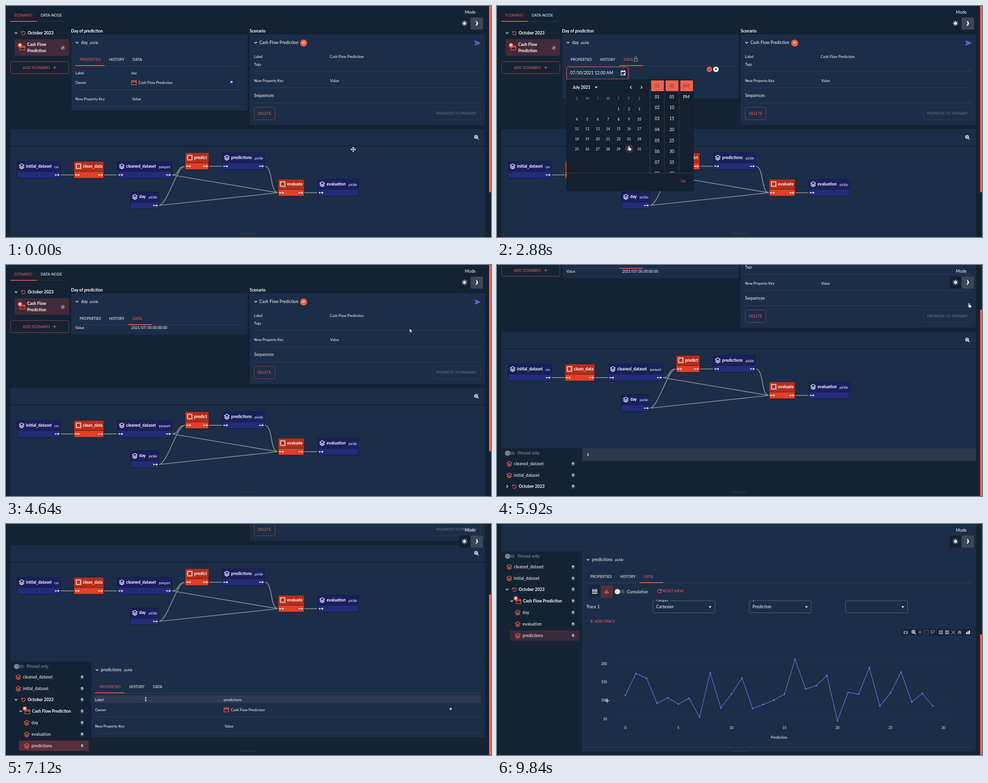
An HTML page that plays this animation: 1007x480 px, repeating every 10000 ms.

```html
<!DOCTYPE html>
<html lang="en">
<head>
<meta charset="utf-8">
<title>Scenario dashboard</title>
<style>
html, body { margin: 0; width: 100%; height: 100%; overflow: hidden; background: #142334; }
svg { display: block; width: 100vw; height: 100vh; }
text { font: 7.5px Lato, "Open Sans", sans-serif; letter-spacing: .01em; fill: #fff; white-space: pre; }
.m { font-size: 8.6px; }
.b { font-size: 8.6px; font-weight: 700; letter-spacing: 0; }
.s { font-size: 6.8px; }
.xs { font-size: 6px; }
.or { fill: #f5604c; }
.gr { fill: #66748a; }
.dim { fill: #8f9aaa; }
.faint { fill: #35455a; }
.mid { text-anchor: middle; }
.end { text-anchor: end; }
.ln { fill: none; stroke: #fff; stroke-width: 1.1; }
.ln.o { stroke: #f5604c; }
.card { fill: #1c2d47; }
.rule { stroke: #34445c; stroke-width: .8; }
.edge { fill: none; stroke: #888c90; stroke-width: 1.7; }
#page { animation: scroll 10s linear infinite; }
#thumb { animation: thumb 10s linear infinite; }
#cursor { animation: cursor 10s ease-in-out infinite; }
@keyframes scroll {
  0%, 52% { transform: translateY(0); }
  57%, 64.5% { transform: translateY(-117px); }
  65.4%, 66.4% { transform: translateY(-140px); }
  68%, 75% { transform: translateY(-212px); }
  78.4% { transform: translateY(-409px); }
  80.5%, 100% { transform: translateY(-441px); }
}
@keyframes thumb {
  0%, 52% { transform: translateY(0) scaleY(.806); }
  57%, 63.19% { transform: translateY(93px) scaleY(.806); }
  63.2%, 64.5% { transform: translateY(90.4px) scaleY(.773); }
  65.4%, 65.59% { transform: translateY(108px) scaleY(.773); }
  65.6%, 66.4% { transform: translateY(97px) scaleY(.694); }
  68%, 74.39% { transform: translateY(146.5px) scaleY(.694); }
  74.4%, 75% { transform: translateY(110.5px) scaleY(.521); }
  78.4% { transform: translateY(212.5px) scaleY(.521); }
  80.5%, 100% { transform: translateY(229.5px) scaleY(.521); }
}
@keyframes cursor {
  0%, 1% { transform: translate(721px, 298px); }
  7.5%, 9% { transform: translate(272px, 108px); }
  14%, 16% { transform: translate(295px, 131px); }
  20%, 22% { transform: translate(262px, 139px); }
  27%, 30% { transform: translate(274px, 291px); }
  33%, 34.5% { transform: translate(386px, 363px); }
  38.5%, 40% { transform: translate(441px, 131px); }
  46.4% { transform: translate(838px, 132px); }
  50%, 59.2% { transform: translate(980px, 79px); }
  62.8%, 64% { transform: translate(21px, 459px); }
  65.4%, 66% { transform: translate(30px, 460px); }
  68%, 68.8% { transform: translate(75px, 460px); }
  71.2% { transform: translate(290px, 364px); }
  72%, 72.6% { transform: translate(314px, 337px); }
  74.2%, 100% { transform: translate(229px, 367px); }
}
</style>
</head>
<body>
<svg id="stage" viewBox="0 0 1007 480" preserveAspectRatio="none"></svg>
<script>
const LOOP = 10000, ORANGE = '#f5604c';
const rules = [];

// Content that is visible only between two times (ms).
function during(from, to, ...parts) {
  const name = `w${from}-${to}`;
  const rule = `@keyframes ${name}{0%{opacity:${from ? 0 : 1}}` +
    (from ? `${from / LOOP * 100}%{opacity:1}` : '') +
    (to < LOOP ? `${to / LOOP * 100}%{opacity:0}100%{opacity:0}}` : '100%{opacity:1}}');
  if (!rules.includes(rule)) rules.push(rule);
  return `<g style="animation:${name} 10s step-end infinite">${parts.join('')}</g>`;
}

// Text is placed by its left edge and vertical middle.
const text = (x, y, s, cls = '') => `<text x="${x}" y="${y + 2.8}" class="${cls}">${s}</text>`;
const box = (x, y, x2, y2, fill, extra = '') =>
  `<rect x="${x}" y="${y}" width="${x2 - x}" height="${y2 - y}" fill="${fill}" ${extra}/>`;
const card = (x, y, x2, y2) => box(x, y, x2, y2, '#1c2d47', 'rx="2"');
const frame = (x, y, x2, y2, color) => box(x + .5, y + .5, x2 - .5, y2 - .5, 'none', `rx="3" stroke="${color}"`);
const rule = (x, x2, y) => `<path class="rule" d="M${x} ${y}H${x2}"/>`;
const dot = (x, y, r, fill) => `<circle cx="${x}" cy="${y}" r="${r}" fill="${fill}"/>`;
const path = (x, y, d, cls = 'ln', extra = '') => `<path transform="translate(${x} ${y})" class="${cls}" d="${d}" ${extra}/>`;
const solid = (x, y, d, fill = '#fff') => path(x, y, d, '', `fill="${fill}"`);

const down = (x, y) => path(x, y, 'M-2.8-1.4L0 1.4L2.8-1.4');
const right = (x, y) => path(x, y, 'M-1.4-2.8L1.4 0L-1.4 2.8');
const left = (x, y) => path(x, y, 'M1.4-2.8L-1.4 0L1.4 2.8');
const caret = (x, y) => solid(x, y, 'M-3-1.5H3L0 1.8Z');
const plus = (x, y) => path(x, y, 'M-3.2 0H3.2M0-3.2V3.2', 'ln o');
const cycle = (x, y) => path(x, y, 'M-2.8-2A3.7 3.7 0 1 1-3.3 2M-3.8-4V-1.4H-1', 'ln o');
const stack = (x, y, cls = 'ln o') => path(x, y, 'M0-5L5-2L0 1L-5-2ZM-5 .6L0 3.4L5 .6M-5 2.8L0 5.6L5 2.8', cls, 'stroke-width=".9"');
const clap = (x, y) => path(x, y, 'M-5-4H5V4.5H-5ZM-5-1H5M-3-4L-1.5-1M0-4L1.5-1M3-4L4.5-1', 'ln o');
const chip = (x, y) => path(x, y, 'M-4.2-4.2H4.2V4.2H-4.2Z') +
  path(x, y, 'M-5.6-5.6H5.6V5.6H-5.6Z', 'ln', 'stroke-dasharray="1.2 1.6" stroke-width="1"');
const pin = (x, y) => dot(x, y, 4.6, '#344357') + solid(x, y, 'M-1.8-3H1.8V0L2.6 1H.5V3.5H-.5V1H-2.6L-1.8 0Z', '#b4bcc8');
const badge = (x, y) => dot(x, y, 4.6, ORANGE) + path(x, y, 'M-1.2 2.4V-2H1.4V.4H-1.2', 'ln', 'stroke-width=".8"');
const launch = (x, y) => box(x - 3, y - 3, x + 3, y + 3, '#3343a8', 'rx="1"') + path(x, y, 'M-1.5 1.5L1.5-1.5M-.5-1.5H1.5V.5', 'ln', 'stroke-width=".8"');
const lens = (x, y, c = '#fff') => `<g fill="none" stroke="${c}" stroke-width="1.3"><circle cx="${x - 1}" cy="${y - 1}" r="3.1"/><path d="M${x + 1.3} ${y + 1.3}l3 3M${x - 2.6} ${y - 1}h3.2M${x - 1} ${y - 2.6}v3.2"/></g>`;

function tabs(xs, y, active, lineEnd) {
  const spans = [[xs[0] - 9, xs[0] + 52], [xs[1] - 9, xs[1] + 40], [xs[2] - 9, xs[2] + 40]];
  const [a, b] = spans[active];
  return ['PROPERTIES', 'HISTORY', 'DATA'].map((s, i) => text(xs[i], y, s, i === active ? 'or' : '')).join('') +
    rule(a < xs[0] ? a : xs[0] - 9, lineEnd, y + 13.5) + box(a, y + 12, b, y + 13.5, ORANGE);
}

function navigation() {
  return text(17, 19, 'SCENARIO', 'or') + text(72, 19, 'DATA-NODE') + rule(9, 125, 32) + box(9, 31, 64, 32.5, ORANGE) +
    down(21, 56) + cycle(36, 56) + text(45, 56, 'October 2023', 'b') +
    box(18, 69, 131, 103.5, '#432a39', 'rx="2"') + clap(34, 87) + badge(29, 81.5) +
    text(44, 80, 'Cash Flow', 'b') + text(44, 93, 'Prediction', 'b') +
    dot(118, 87, 4.8, '#65505d') + path(118, 87, 'M-1.8 1.8L1.8-1.8', 'ln', 'stroke-width="1.8"') +
    frame(9, 115, 131, 141, '#843f40') + text(35, 128, 'ADD SCENARIO', 'or') + plus(101, 128);
}

function picker() {
  let out = box(145, 153, 408, 384, '#14202f', 'rx="3" stroke="#0f1a28"') +
    text(157, 169, 'July 2021', 'b') + caret(206, 169) + left(278, 169) + right(300, 169);
  [...'SMTWTFS'].forEach((d, i) => out += text(166 + 21.6 * i, 192, d, 's mid dim'));
  out += during(2720, 3440, dot(274.5, 296.5, 9, '#3b3138'));
  for (let d = 1; d <= 31; d++) {
    const cell = d + 3;
    out += text(166 + 21.6 * (cell % 7), 214 + 20.7 * Math.floor(cell / 7), d, 's mid');
  }
  const two = n => String(n).padStart(2, '0');
  [320, 350, 380.5].forEach(x => out += box(x, 154.5, x + 26.5, 177, ORANGE) + `<path class="rule" d="M${x - 2.5} 154V347"/>`);
  let rows = '';
  for (let i = 0; i < 9; i++) {
    const y = 166 + 22.75 * i, cls = i ? 'm mid' : 'm mid faint';
    rows += text(332.5, y, two(i || 12), cls) + text(363, y, two(i * 5), cls);
    if (i < 2) rows += text(393, y, i ? 'PM' : 'AM', cls);
  }
  return out + `<g clip-path="url(#list)">${rows}</g>` + rule(145, 408, 347) + text(381, 364, 'OK', 'or');
}

function dayPanel() {
  const x = [153, 214, 263];
  const head = down(147.5, 76) + text(156, 76, 'day', 'm') + text(174, 76.5, 'pickle', 's');
  const value = (a, b, date) => during(a, b, card(136, 59, 501.5, 144.5), head, tabs(x, 111, 2, 494),
    text(144, 130, 'Value'), text(260, 130, date + ' 00:00:00'));
  return text(135, 52, 'Day of prediction', 'b') +
    during(0, 840, card(136, 59, 501.5, 217), head, tabs(x, 111, 0, 494),
      text(144, 139, 'Label'), text(260, 139, 'day'), text(144, 159, 'Owner'), clap(265.5, 159),
      text(275, 159, 'Cash Flow Prediction'), launch(468, 158), rule(144, 494, 174),
      text(144, 193, 'New Property Key'), text(262, 193, 'Value'), rule(144, 494, 208)) +
    value(840, 1560, '2021/07/26') + value(3960, LOOP, '2021/07/30') +
    during(1560, 3960, card(136, 59, 501.5, 191.5), head, tabs(x, 111, 2, 494),
      path(288, 110.5, 'M-3-1H3V4.5H-3ZM-2-1V-3A2 2 0 0 1 2-3V-1', 'ln', 'style="stroke:#8f9aaa"'),
      frame(144, 126, 273.5, 152.5, ORANGE),
      during(1560, 2800, text(152, 139, '07/26/2021 12:00 AM', 'm')),
      during(2800, 3960, text(152, 139, '07/30/2021 12:00 AM', 'm')),
      path(262, 139, 'M-4.2-4H4.2V4.5H-4.2ZM-4.2-2.6H4.2M-2.4-5.5V-3M2.4-5.5V-3'), box(263, 140, 265.5, 142.5, '#fff'),
      dot(441, 131.5, 5.6, ORANGE), path(441, 131.5, 'M-2.6 0L-.6 2L2.8-1.8', 'ln', 'style="stroke:#26202c"'),
      dot(454.5, 131.5, 5.6, '#fff'), path(454.5, 131.5, 'M-2-2L2 2M2-2L-2 2', 'ln', 'style="stroke:#14202f"'));
}

function scenarioPanel() {
  return text(506, 52, 'Scenario', 'b') + card(506, 59, 994.5, 247) + down(518.5, 76) +
    text(526, 76, 'Cash Flow Prediction', 'm') + dot(618, 77, 7.2, ORANGE) + path(618, 77, 'M-1.5 2V-1.5H1.5V.5', 'ln', 'stroke-width=".8"') +
    solid(979, 77, 'M-6-5.5L7 0L-6 5.5L-5 1L1 0L-5-1Z', '#5b70d8') +
    text(515, 105, 'Label') + text(672, 105, 'Cash Flow Prediction') + text(515, 121, 'Tags') + rule(515, 986, 136) +
    text(515, 155, 'New Property Key') + text(673, 155, 'Value') + rule(515, 986, 170) +
    text(515, 186.5, 'Sequences', 'm') + rule(515, 986, 201.5) +
    frame(515, 210, 559, 237, '#843f40') + text(523, 223.5, 'DELETE', 'or') +
    frame(885, 210, 986, 237, '#2c3b52') + text(893, 223.5, 'PROMOTE TO PRIMARY', 'gr');
}

// x, y, width, name, type (none for tasks), has input, has output
const NODES = [
  [23, 323, 90, 'initial_dataset', 'csv', 0, 1], [141, 323, 62, 'clean_data', '', 1, 1],
  [231, 323, 113, 'cleaned_dataset', 'parquet', 1, 1], [372, 305, 49, 'predict', '', 1, 1],
  [449, 305, 88, 'predictions', 'pickle', 1, 1], [258, 386.5, 59, 'day', 'pickle', 0, 1],
  [565, 360, 54, 'evaluate', '', 1, 1], [647, 360, 85, 'evaluation', 'pickle', 1, 0]
];
const LINKS = [[0, 1], [1, 2], [2, 3], [2, 6], [5, 3], [5, 6], [3, 4], [4, 6], [6, 7]];

function graph() {
  const port = (x, y) => dot(x - 3.2, y, 1.3, '#fff') + path(x, y, 'M-3 0H4M2-1.8L4.2 0L2 1.8');
  const edges = LINKS.map(([a, b]) => {
    const x1 = NODES[a][0] + NODES[a][2], y1 = NODES[a][1] + 28, x2 = NODES[b][0], y2 = NODES[b][1] + 28;
    const c = x2 - x1 > 100 ? 4 : 18;
    return `<path class="edge" d="M${x1} ${y1}C${x1 + c} ${y1} ${x2 - c} ${y2} ${x2} ${y2}"/>`;
  }).join('');
  const nodes = NODES.map(([x, y, w, name, type, input, output]) =>
    box(x, y, x + w, y + 35, type ? '#232c79' : '#e23f27', 'rx="2" stroke="#10182c"') +
    box(x + .5, y + .5, x + w - .5, y + 21, type ? '#1a1f5d' : '#b52d1b') +
    `<path d="M${x} ${y + 21}h${w}" stroke="#10182c" stroke-opacity=".7"/>` +
    (type ? stack(x + 9.5, y + 10, 'ln') + text(x + w - 3, y + 11, type, 's end') : chip(x + 9.5, y + 10)) +
    text(x + 18.5, y + 10, name, 'b') +
    (input ? port(x + 7, y + 28) : '') + (output ? port(x + w - 7, y + 28) : '')).join('');
  return card(9, 256, 994.5, 498) + `<path d="M9 291H994" stroke="#121f31" stroke-width="1.5"/>` + lens(977, 273) + edges + nodes;
}

function tree() {
  const row = (y, x, name, cls) => text(x, y, name, cls) + pin(158, y);
  const leaf = (y, name) => stack(43, y) + row(y, 53, name, 'm');
  return box(17, 504.5, 37, 511.5, '#3f4a58', 'rx="3.5"') + dot(22, 508, 5.6, '#77808c') + text(43, 508.5, 'Pinned only', 'm dim') +
    stack(25.5, 530) + row(530, 35, 'cleaned_dataset', 'm') + stack(25.5, 554) + row(554, 35, 'initial_dataset', 'm') +
    during(0, 6320, right(21, 577)) + during(6320, LOOP, down(21, 577)) + cycle(36, 577) + row(577, 45, 'October 2023', 'b') +
    during(6320, LOOP, clap(44.5, 602), badge(39, 595.5), row(601, 54, 'Cash Flow Prediction', 'b'),
      during(6320, 6560, right(30, 601))) +
    during(6560, LOOP, down(30.5, 601),
      during(6840, 7320, box(27, 662, 171.5, 683.5, '#592f39', 'rx="2"')),
      during(7320, LOOP, box(27, 662, 171.5, 683.5, '#3c2a39', 'rx="2"')),
      leaf(625, 'day'), leaf(649, 'evaluation'), leaf(673, 'predictions'));
}

const VALUES = [114, 173, 160, 92, 107, 90, 106, 55, 175, 80, 117, 161, 78, 89, 101,
  117, 212, 131, 140, 168, 45, 122, 117, 189, 85, 120, 177, 96, 119, 85];

function chart() {
  const px = i => 266.5 + 22.02 * i, py = v => 884.2 - .766 * v;
  let out = '';
  for (let v = 50; v <= 200; v += 50)
    out += `<path d="M238 ${py(v)}H955" stroke="#24354e" stroke-width=".8"/>` + text(228.5, py(v), v, 's end');
  for (let i = 0; i <= 30; i += 5) out += text(px(i), 864, i, 's mid');
  const points = VALUES.map((v, i) => [px(i), py(v)]);
  return out + `<polyline points="${points.join(' ')}" fill="none" stroke="#636bd6" stroke-width="1.3"/>` +
    points.map(([x, y]) => dot(x, y, 1.6, '#6d76e6')).join('') + text(585.5, 884, 'Prediction', 'mid');
}

function modebar() {
  const grey = 'style="stroke:#7c8794"';
  const icon = (x, d) => path(x, 666, d, 'ln', grey);
  return box(838, 659.5, 985, 673, '#17243a') + box(844, 663.5, 853, 669.5, '#7c8794', 'rx="1"') + dot(848.5, 666.5, 1.7, '#17243a') +
    lens(865.5, 666, '#e8ebf0') + icon(878.5, 'M-4 0H4M0-4V4') + path(891.5, 666, 'M-4-4H4V4H-4Z', 'ln', grey + ' stroke-dasharray="1.6 1.2"') +
    icon(904.5, 'M-3 4Q-1 2-3 1Q-6-3 0-3.6Q6-3 3 0Q0 2-3 1') +
    [921.5, 934.5].map(x => box(x - 4, 662, x + 4, 670, '#7c8794')).join('') +
    path(921.5, 666, 'M-2.5 0H2.5M0-2.5V2.5', 'ln', 'style="stroke:#17243a"') + path(934.5, 666, 'M-2.5 0H2.5', 'ln', 'style="stroke:#17243a"') +
    icon(947.5, 'M-4-4L4 4M4-4L-4 4') + solid(960.5, 666, 'M-4.5 0L0-4L4.5 0H3V4H1V1H-1V4H-3V0Z', '#7c8794') +
    solid(978, 666, 'M-4 4V0H-2V4ZM-1 4V-2H1V4ZM2 4V-4H4V4Z');
}

function nodePanel() {
  const x = [194, 256, 305];
  const head = down(189, 515) + text(197, 515, 'predictions', 'm') + text(245, 515.5, 'pickle', 's');
  const select = (left, label, value) => frame(left, 600, left + 130, 626, '#566377') +
    (label ? box(left + 6, 598, left + 9 + label.length * 3.4, 603, '#1c2d47') + text(left + 8, 599.5, label, 'xs') : '') +
    text(left + 7.5, 613, value, 'm') + caret(left + 119.5, 613.5);
  const bars = solid(228, 581.5, 'M-4 4V-1H-2V4ZM-1 4V-4H1V4ZM2 4V1H4V4Z', ORANGE);
  const table = path(203, 581, 'M-4.5-4H4.5V4.5H-4.5ZM-4.5-1.4H4.5M-1.5-1.4V4.5M1.5-1.4V4.5');
  return during(0, 6840, box(177, 498, 994.5, 524, '#2c384d'), right(189, 511)) +
    during(6840, 7240, card(177, 498, 994.5, 655), head, tabs(x, 550, 0, 986),
      during(7000, 7160, box(182, 568, 986, 584, '#2d3a50')),
      text(185, 577.5, 'Label'), text(452, 577.5, 'predictions'), text(185, 598, 'Owner'), clap(457.5, 598),
      text(467, 598, 'Cash Flow Prediction'), launch(923, 596.5), rule(185, 986, 613),
      text(185, 632, 'New Property Key'), text(454, 632, 'Value'), rule(185, 986, 647)) +
    during(7240, 7440, card(177, 498, 994.5, 655), head, tabs(x, 550, 2, 986),
      box(191, 569, 215.5, 594, '#542f3b'), table, bars) +
    during(7440, LOOP, card(177, 498, 994.5, 914), head, tabs(x, 550, 2, 986),
      box(191, 569, 215.5, 594, '#18273b'), box(215.5, 569, 240.5, 594, '#542f3b'), table, bars,
      box(247, 577.8, 264.5, 585, '#46525f', 'rx="3.6"'), dot(250, 581.5, 5.6, '#dfe2e6'), text(270, 582, 'Cumulative', 'm'),
      path(337.5, 580.5, 'M3.4-2A4 4 0 1 0 4 1M4-4.4V-1.4H1', 'ln o'), text(344, 580.5, 'RESET VIEW', 'or'),
      text(185.5, 613.5, 'Trace 1', 'm'), select(323, 'Category', 'Cartesian'), select(523, 'x', 'Prediction'), select(723, '', ''),
      plus(196, 643), text(203, 643, 'ADD TRACE', 'or'), chart(), rule(186, 985, 905.5),
      during(7920, LOOP, modebar()));
}

function fixedParts() {
  const rays = Array.from({ length: 8 }, (_, i) =>
    `<path transform="rotate(${i * 45} 952 36)" d="M952 30.4v1.8" stroke="#fff" stroke-width="1.3"/>`).join('');
  return text(964, 13, 'Mode', 'm mid') + box(940, 24, 964.5, 49, '#142031', 'rx="2"') + box(964.5, 24, 990.5, 49, '#3a475a', 'rx="2"') +
    dot(952, 36, 2.9, '#fff') + rays + solid(977, 36, 'M-2-5A5 5 0 1 1-2.5 5A6.5 6.5 0 0 0-2-5Z') +
    text(502, 471, 'Node inside', 'xs mid faint') +
    box(1003, 0, 1007, 480, '#152132') + `<rect id="thumb" x="1003" width="4" height="480" fill="#f5604c"/>`;
}

function cursor() {
  const outline = 'fill="#fff" stroke="#111" stroke-width=".5"';
  const arrow = path(0, 0, 'M0 0V8L1.9 6.3L3.2 9L4.6 8.4L3.4 5.8H5.8Z', '', outline);
  const hand = path(0, 0, 'M0 0Q1.2-.4 1.4 1V4L4.6 4.6Q5.4 5 5.2 6.4L4.4 9.5H0L-2.8 6Q-2.4 4.8-1 5.8V1Q-1 .1 0 0Z', '', outline);
  const beam = path(0, 0, 'M-1.5-3.5H1.5M0-3.5V3.5M-1.5 3.5H1.5', 'ln', 'stroke-width=".8"');
  const move = path(0, 0, 'M-4 0H4M0-4V4M-1.5-3L0-4.5L1.5-3M-1.5 3L0 4.5L1.5 3M-3-1.5L-4.5 0L-3 1.5M3-1.5L4.5 0L3 1.5');
  const cross = path(0, 0, 'M-4.5 0H4.5M0-4.5V4.5');
  return `<g id="cursor">` + during(0, 240, move) + during(240, 680, arrow) + during(680, 1200, hand) + during(1200, 1640, beam) +
    during(1640, 1960, arrow) + during(1960, 4160, hand) + during(4160, 4960, arrow) + during(4960, 6960, hand) +
    during(6960, 7160, beam) + during(7160, 7920, hand) + during(7920, LOOP, cross) + '</g>';
}

const page = navigation() + dayPanel() + scenarioPanel() + graph() + tree() + nodePanel() + during(2120, 3440, picker());
const scene = '<clipPath id="list"><path d="M317 154H408V346.5H317Z"/></clipPath>' + box(0, 0, 1007, 480, '#142334') +
  `<g id="page">${page}</g>` + fixedParts() + cursor();
document.head.appendChild(document.createElement('style')).textContent = rules.join('\n');
document.getElementById('stage').innerHTML = scene;
</script>
</body>
</html>
```
